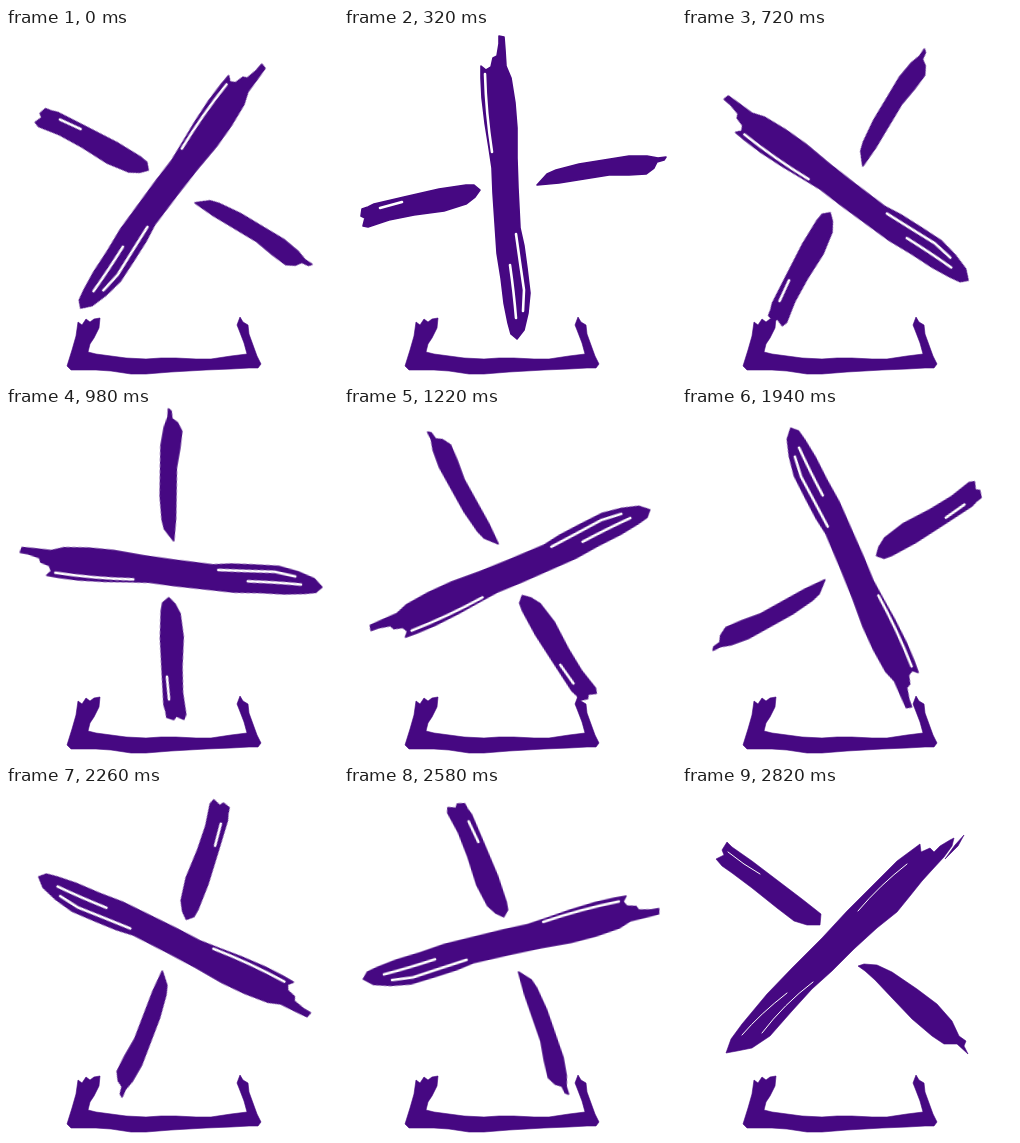
These frames come from a looping animation (332x351 px, 2900 ms). An HTML page:

```html
<!DOCTYPE html>
<html lang="en">
<head>
<meta charset="utf-8">
<title>Spinning brush strokes</title>
<style>
  html, body { margin: 0; width: 100%; height: 100%; overflow: hidden; background: #fff; }
  svg { display: block; width: 332px; height: 351px; fill: #460882; }
  polygon { stroke: #460882; stroke-width: .6; stroke-linejoin: round; }
  .turning polygon { stroke-width: 1.6; }
  .gap { fill: none; stroke: #fff; stroke-width: 2.6; stroke-linecap: round; }
  .thin { stroke-width: 1; }
  .spin { transform-origin: 166.5px 160.5px; animation: spin 2900ms infinite; }
  .turning { animation: hide 2900ms step-end infinite; }
  .resting { animation: show 2900ms step-end infinite; }

  /* 36 turns of 10deg, 80ms each; the tenth pose holds 100ms */
  @keyframes spin {
    0% { transform: rotate(40deg); animation-timing-function: steps(9); }
    24.827% { transform: rotate(-50deg); animation-timing-function: step-end; }
    28.275% { transform: rotate(-60deg); animation-timing-function: steps(26); }
    100% { transform: rotate(-320deg); }
  }
  @keyframes hide { 0% { visibility: visible; } 97.241%, 100% { visibility: hidden; } }
  @keyframes show { 0% { visibility: hidden; } 97.241%, 100% { visibility: visible; } }
</style>
</head>
<body>
<svg viewBox="0 0 332 351">
  <filter id="rough" filterUnits="userSpaceOnUse" x="0" y="0" width="332" height="351" color-interpolation-filters="sRGB">
    <feTurbulence type="fractalNoise" baseFrequency=".25" numOctaves="1" seed="4"/>
    <feDisplacementMap in="SourceGraphic" scale="1.6" xChannelSelector="R" yChannelSelector="G"/>
  </filter>

  <!-- tray -->
  <polygon points="72,294 76,297 80,291 84,294 88,291 94,290 93,300 88,310 84,316 82,324 90,326 105,328 120,330 140,331 155,330 170,330 190,331 205,331 225,328 241,326 238,315 233,302 231,297 234,289 237,294 242,297 243,306 247,317 251,328 255,336 252,340 243,340 225,341 200,342 165,344 140,346 125,346 105,343 90,342 65,342 61,338 66,322 70,308"/>

  <g class="turning">
    <g class="spin">
      <g filter="url(#rough)">
        <polygon points="155,8 160,9 161,22 162,38 167,50 171,75 173,100 173,130 174,160 176,200 180,218 183,240 186,265 184,285 180,302 173,311 167,306 164,295 160,275 157,250 153,225 151,195 149,165 148,140 145,120 141,95 138,70 137,50 137,38 142,42 147,39 149,30 153,28 155,16"/>
        <polygon points="18,181 24,179 30,176 60,169 95,161 122,157 130,157 136,162 131,169 122,176 100,183 70,187 45,192 24,199 19,198 21,190 17,188"/>
        <polygon points="193,157 203,146 212,142 235,136 260,132 285,128 303,128 314,130 322,129 320,132 313,134 310,140 302,146 285,147 265,147 240,151 215,155"/>
        <g class="gap">
          <path d="M141 46Q142 85 148 124"/>
          <path d="M172 206Q176 235 180 262L179 283"/>
          <path d="M166 237Q170 265 172 290"/>
          <path d="M36 180L58 174"/>
        </g>
      </g>
    </g>
  </g>

  <g class="resting">
    <polygon points="44,267 49,253 60,238 85,208 110,182 140,152 165,125 190,100 215,75 238,58 239,66 248,62 252,66 258,60 268,54 272,52 270,60 262,71 250,84 240,95 228,110 215,126 195,142 172,163 150,185 130,203 110,225 88,250 70,262 55,265"/>
    <polygon points="282,49 276,60 263,73 273,59"/>
    <polygon points="45,56 50,61 70,75 95,94 120,113 134,124 139,128 138,139 125,139 112,135 95,122 70,102 50,87 40,80 34,73 42,69 40,64"/>
    <polygon points="176,180 182,178 195,179 210,186 235,203 255,218 270,235 277,250 284,255 282,260 286,268 275,258 262,258 250,250 230,233 210,212 193,194 183,185"/>
    <g class="gap thin">
      <path d="M176 125Q198 99 225 78"/>
      <path d="M60 249Q78 228 105 207"/>
      <path d="M80 247Q102 218 131 196"/>
      <path d="M46 66Q62 79 78 88"/>
    </g>
  </g>
</svg>
</body>
</html>
```
